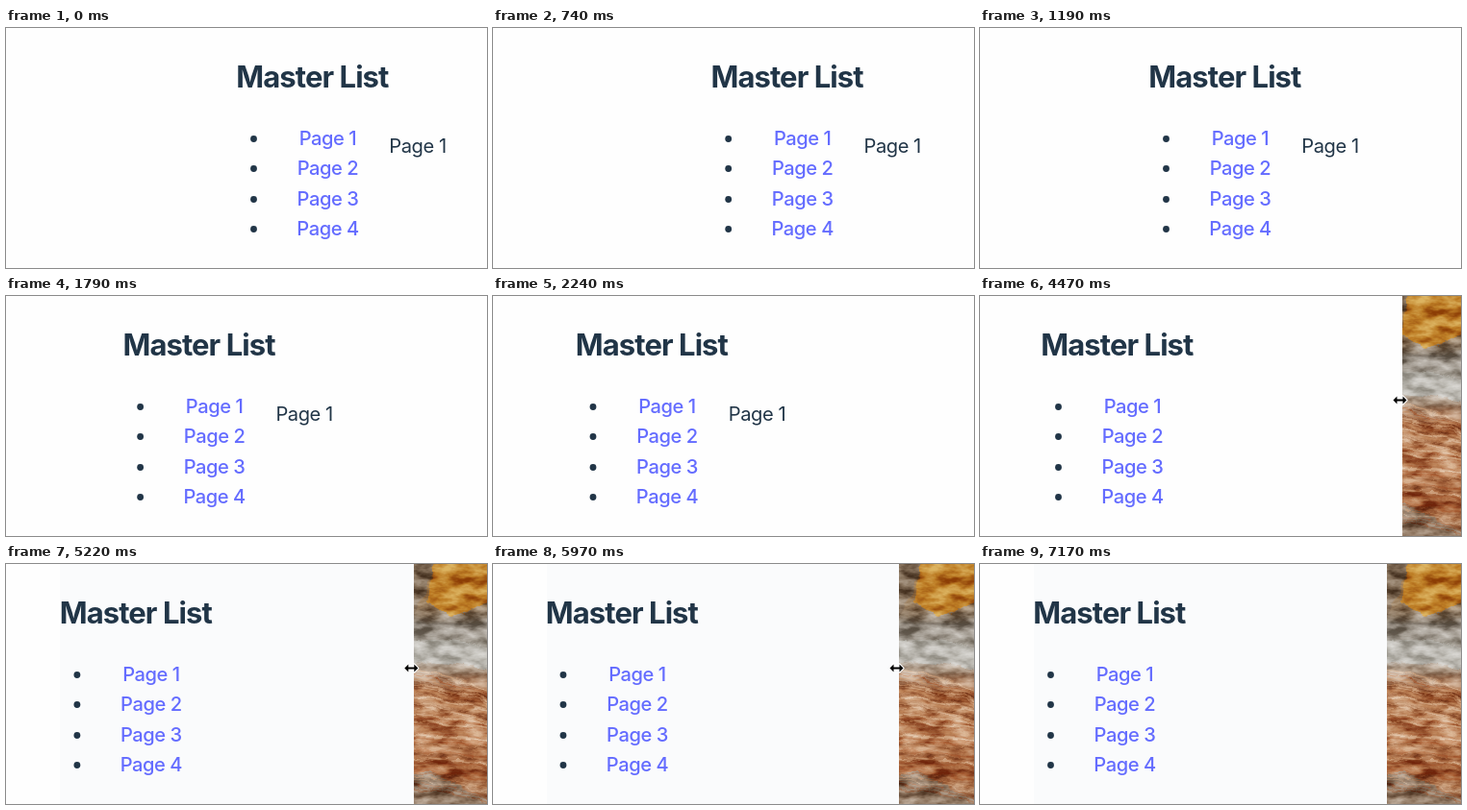
Animation, 500 px wide and 250 px high, one loop 7.19 s. Source, as an HTML page:

```html
<!DOCTYPE html>
<html lang="en">
<head>
<meta charset="utf-8">
<title>Responsive master list</title>
<style>
  html, body { margin: 0; width: 100%; height: 100%; overflow: hidden; background: #fefefe; }
  svg { display: block; width: 100%; height: 100%; }
  text { font-family: Inter, "Open Sans", sans-serif; text-anchor: middle; fill: #213547; }
  .title { font-size: 31px; font-weight: 700; letter-spacing: -0.03em; }
  .page { font-size: 20.1px; letter-spacing: -0.022em; }
  .link { font-weight: 500; fill: #646cff; }
  .dot { fill: #213547; }
</style>
</head>
<body>
<svg viewBox="0 0 500 250">
  <defs>
    <linearGradient id="rock" x1="0" y1="0" x2="0" y2="1">
      <stop offset="0" stop-color="#a8732f"/>
      <stop offset=".18" stop-color="#8f6f4c"/>
      <stop offset=".27" stop-color="#948b80"/>
      <stop offset=".38" stop-color="#b3aea5"/>
      <stop offset=".45" stop-color="#b09a86"/>
      <stop offset=".53" stop-color="#b1754c"/>
      <stop offset=".7" stop-color="#b87f56"/>
      <stop offset=".85" stop-color="#a9673d"/>
      <stop offset="1" stop-color="#977356"/>
    </linearGradient>
    <filter id="grain" filterUnits="userSpaceOnUse" x="400" y="0" width="100" height="250"
            color-interpolation-filters="sRGB">
      <feTurbulence type="fractalNoise" baseFrequency=".04 .09" numOctaves="4" seed="7" result="noise"/>
      <feDisplacementMap in="SourceGraphic" in2="noise" scale="9"
                         xChannelSelector="R" yChannelSelector="G" result="rough"/>
      <feColorMatrix in="noise" values="2 0 0 0 -.5  2 0 0 0 -.5  2 0 0 0 -.5  0 0 0 0 1" result="shade"/>
      <feBlend in="shade" in2="rough" mode="soft-light"/>
    </filter>
  </defs>
  <g id="rocks" filter="url(#grain)">
    <rect x="390" y="-10" width="120" height="270" fill="url(#rock)"/>
    <path d="M390 -10H448L436 30L420 58H390Z" fill="#85705a"/>
    <path d="M446 -10H510V36L464 56L438 40Z" fill="#bd7d25"/>
    <path d="M390 88Q450 68 510 92V112Q450 98 390 104Z" fill="#bcb9b2"/>
    <path d="M390 226L440 216L510 250V260H390Z" fill="#907761"/>
  </g>
  <rect id="sheet" height="250" fill="#fefefe"/>
  <rect id="tint" x="56" height="250" fill="#fafbfc"/>
  <g id="list"><text class="title" x="318.4" y="62">Master List</text></g>
  <text id="detail" class="page" x="428" y="130">Page 1</text>
  <path id="cursor" d="M-7 0L-3 -4V-1H3V-4L7 0L3 4V1H-3V4Z"
        fill="#000" stroke="#fff" stroke-width="2.4" paint-order="stroke" stroke-linejoin="round"/>
</svg>
<script>
const LOOP = 7190;
const FIRST_MOVE = 595;
const TICK = 148.8;
const BREAKPOINT = 460;

// Drag key points: [tick, right edge of the page], linear in between
const drag = [
  [-1, 849], [4, 721], [7, 637], [11, 542], [14, 521], [21, 520],
  [24, 464], [26, 439], [27, 431], [32, 422], [36, 422], [39, 423]
];

const $ = id => document.getElementById(id);

function add(parent, tag, attrs, label = '') {
  const el = document.createElementNS('http://www.w3.org/2000/svg', tag);
  for (const key in attrs) el.setAttribute(key, attrs[key]);
  el.textContent = label;
  parent.appendChild(el);
}

function show(id, visible) {
  $(id).style.display = visible ? '' : 'none';
}

function move(id, x, y = 0) {
  $(id).setAttribute('transform', `translate(${x} ${y})`);
}

for (let i = 0; i < 4; i++) {
  const y = 122 + Math.round(i * 31.4);
  add($('list'), 'circle', { class: 'dot', cx: 257.5, cy: y - 6.5, r: 3.4 });
  add($('list'), 'text', { class: 'page link', x: 334.5, y }, `Page ${i + 1}`);
}

let seed = 11;
function random() {
  seed = (seed * 16807) % 2147483647;
  return seed / 2147483647;
}

// Curved strata that fall to the right, steepest at the top
const strata = ['#d8b08c', '#8f4f2b', '#c48a5f', '#a85a30'];
for (let i = 0; i < 40; i++) {
  const y = 108 + i * 3.2;
  const fall = 24 * Math.abs(1 - i / 24) + 4;
  add($('rocks'), 'path', {
    d: `M390 ${y}Q450 ${y} 510 ${y + fall}`,
    fill: 'none',
    stroke: strata[Math.floor(random() * strata.length)],
    'stroke-width': 0.6 + random() * 1.6,
    opacity: 0.7
  });
}

function edgeAt(tick) {
  const next = drag.findIndex(key => key[0] >= tick);
  if (next < 0) return drag.at(-1)[1];
  if (next === 0) return drag[0][1];
  const [t0, a] = drag[next - 1];
  const [t1, b] = drag[next];
  return a + (b - a) * (tick - t0) / (t1 - t0);
}

function draw(time) {
  const tick = Math.floor((time - FIRST_MOVE) / TICK);
  const edge = edgeAt(tick);
  const wide = edge > BREAKPOINT;
  // Content stays centred; losing the detail column re-centres the list
  const shift = (edge - 849) / 2 + (wide ? 0 : 29);

  $('sheet').setAttribute('width', edge);
  $('tint').setAttribute('width', Math.max(0, edge - 56));
  show('tint', tick >= 29);
  move('list', shift);
  move('detail', shift);
  show('detail', wide);
  move('cursor', edge - 2.5, 108.5);
  show('cursor', edge < 510 && tick < 39);
}

const start = performance.now();
function frame() {
  draw((performance.now() - start) % LOOP);
  requestAnimationFrame(frame);
}
frame();
</script>
</body>
</html>
```
